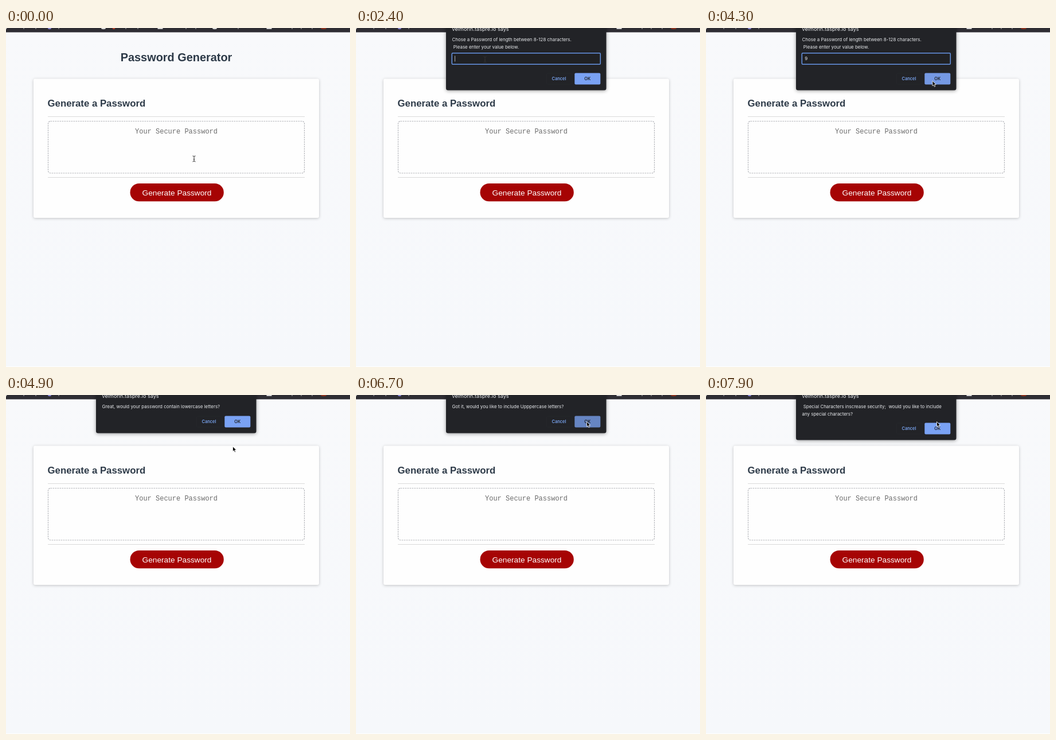
An HTML page for the animation above (8000 ms loop, 600 by 591 pixels).

```html
<!DOCTYPE html>
<html lang="en">
<head>
<meta charset="utf-8">
<title>Password Generator</title>
<style>
  html, body { margin: 0; width: 100%; height: 100%; overflow: hidden; background: #fff; }
  svg { display: block; width: 600px; height: 591px; }
  text { white-space: pre; font-family: "Liberation Sans", Arial, sans-serif; }
  .heading { font-weight: bold; fill: #2d3a48; }
  .mid { text-anchor: middle; }
  .card { filter: drop-shadow(0 1px 2.5px rgba(0, 0, 0, .22)); }
  #dialog { filter: drop-shadow(0 1px 3px rgba(0, 0, 0, .4)); }
  #dialog text { font: 7.95px Inter, sans-serif; fill: #e8eaed; }
  #dialog .host { font-size: 9.1px; }
  #dialog .label { font-size: 7.4px; font-weight: 600; }
</style>
</head>
<body>
<svg viewBox="0 0 600 591">
  <defs>
    <linearGradient id="page" x2="0" y2="1">
      <stop stop-color="#f8f9fb"/><stop offset="1" stop-color="#f6f8fb"/>
    </linearGradient>
  </defs>
  <rect width="600" height="590" fill="url(#page)"/>
  <rect width="600" height="7.5" fill="#2e2d33"/>
  <g id="bookmarks"></g>

  <text class="heading mid" x="297" y="58" font-size="19.9">Password Generator</text>
  <rect class="card" x="48" y="88.500" width="498" height="242.500" rx="3" fill="#fefefe"/>
  <text class="heading" x="72.500" y="136.700" font-size="16.8">Generate a Password</text>
  <path d="M73 154.500H521M73 260.500H521" stroke="#dadada"/>
  <rect x="73.500" y="162.500" width="447" height="90.500" rx="4" fill="none" stroke="#b3b5ba" stroke-width="1.200" stroke-dasharray="2.600 1.400"/>
  <text class="mid" x="297" y="183.500" font-size="12" fill="#6c6c6c" style="font-family:'Liberation Mono',monospace">Your Secure Password</text>
  <rect x="216.500" y="271" width="163.300" height="31.300" rx="15.650" fill="#a60404"/>
  <text class="mid" x="298" y="291.500" font-size="13.7" fill="#fff">Generate Password</text>

  <g id="dialog">
    <rect id="panel" x="157" y="-8" width="279.500" rx="3.500" fill="#222327"/>
    <text class="host" x="167.500" y="5.300">velmorin.taspre.io says</text>
    <text id="line1" x="167.500" y="23"></text>
    <text id="line2" x="167.500" y="35.500"></text>
    <g id="field">
      <rect x="167.300" y="43.800" width="259" height="19.500" rx="1.500" fill="#202124" stroke="#6795e6" stroke-width="1.500"/>
      <text id="typed" x="172.300" y="56.300">9</text>
      <path id="caret" d="M0 48.500V58.500" stroke="#d5d7da" stroke-width=".8"/>
    </g>
    <g id="buttons">
      <rect x="332.500" y=".5" width="43.500" height="19" rx="2" fill="none" stroke="#27292d" stroke-width=".7"/>
      <text class="label mid" x="354" y="12.600" style="fill:#76a0ea">Cancel</text>
      <rect id="ok" x="381.300" width="45" height="20" rx="2"/>
      <text class="label mid" x="403.800" y="12.600" style="fill:#202124">OK</text>
    </g>
  </g>

  <g id="cursor">
    <path id="arrow" d="M0 0V8.700L2 6.900 3.400 10.200 5 9.500 3.600 6.300H6.300Z" fill="#080808" stroke="#fff" stroke-width=".8"/>
    <path id="beam" d="M-2.500-5Q0-5 0-3.500Q0-5 2.500-5M0-3.500V3.500M-2.500 5Q0 5 0 3.500Q0 5 2.500 5M-1.200 1H1.200" fill="none" stroke="#333"/>
    <path id="hand" d="M-1 0Q0-1 1 0V4L5 5Q6 5 6 6.500L5 11H0L-3.500 7Q-3.500 5.500-2 6L-1 7Z" fill="#fff" stroke="#111" stroke-width=".8"/>
  </g>
</svg>
<script>
const LOOP = 8000, STEP = 100;
const $ = id => document.getElementById(id);
const ramp = (t, start, length) => Math.min(1, Math.max(0, (t - start) / length));
const show = (id, visible) => $(id).setAttribute("visibility", visible ? "inherit" : "hidden");

const dialogs = [
  { start: 950, end: 4550, height: 108.5, prompt: true,
    lines: ["Chose a Password of length between 8-128 characters.", " Please enter your value below."] },
  { start: 4650, end: 5950, height: 66.5, lines: ["Great, would your password contain lowercase letters?"] },
  { start: 6050, end: 6750, height: 66.5, lines: ["Got it, would you like to include Upppercase letters?"] },
  { start: 6850, end: 7650, height: 66.5, lines: ["Okay, would you like to include any numbers?"] },
  { start: 7750, end: 9000, height: 78.5,
    lines: [" Special Characters inscrease security;  would you like to include", "any special characters?"] }
];

// time, x, y of the pointer
const path = [
  [0, 328, 228], [800, 300, 279], [1100, 298.5, 276], [1400, 297, 270], [1900, 286, 100], [2200, 225, 55],
  [3400, 225, 55], [3800, 394.5, 94], [4900, 395.5, 89.8], [5200, 396, 89], [5700, 402.5, 46.5], [LOOP, 402.5, 46.5]
];

// [x, width, colour, round] of the sliced-off toolbar icons
const icons = [
  [0, 3, "#ccc", 1], [76, 6, "#8a86d8", 1], [170, 8, "#ddd", 1], [188, 5, "#b5432e", 1],
  [269, 9, "#e4e4e6"], [364, 8, "#ddd", 1], [459, 9, "#e4e4e6"], [554, 10, "#8c3420", 1],
  ...[31, 52, 92, 209, 230, 314, 331, 405, 499, 515, 534].map(x => [x, 1.5, "#929298"])
];
$("bookmarks").innerHTML = icons.map(([x, w, fill, round]) => round
  ? `<ellipse cx="${x}" cy="0" rx="${w / 2}" ry="2.2" fill="${fill}"/>`
  : `<rect x="${x - w / 2}" width="${w}" height="1.8" fill="${fill}"/>`).join("");

function pointerAt(t) {
  const i = path.findIndex(key => key[0] > t);
  const [t0, x0, y0] = path[i - 1], [t1, x1, y1] = path[i];
  const p = ramp(t, t0, t1 - t0), eased = p * p * (3 - 2 * p);
  return [x0 + (x1 - x0) * eased, y0 + (y1 - y0) * eased];
}

function drawDialog(t, x, y) {
  const dialog = dialogs.findLast(d => t >= d.start);
  show("dialog", dialog);
  if (!dialog) return;
  const { start, end, height, prompt, lines } = dialog;
  const top = height - 30;
  $("dialog").setAttribute("opacity", Math.min(ramp(t, start, 150), 1 - ramp(t, end, 100)));
  $("panel").setAttribute("height", height + 8);
  $("buttons").setAttribute("transform", `translate(0 ${top})`);
  $("line1").textContent = lines[0];
  $("line2").textContent = lines[1] || "";

  const typed = t >= 2600;
  const caretOn = t < 1500 || (t >= 2000 && t < 3000) || (t >= 3400 && t < 3700);
  show("field", prompt);
  show("typed", prompt && typed);
  show("caret", prompt && caretOn);
  $("caret").setAttribute("transform", `translate(${typed ? 178 : 172.6})`);

  const hover = prompt && x > 381 && y > top && y < top + 20;
  const pressed = t >= end - 140;
  $("ok").setAttribute("fill", pressed ? "#6685c3" : hover ? "#7599e4" : "#7aa2f4");
}

function draw(t) {
  const [x, y] = pointerAt(t);
  drawDialog(t, x, y);
  const open = t >= dialogs[0].start;
  const inText = open ? t < 3600 && y > 44 && y < 64 : y < 253;
  const onButton = !open && y > 271;
  show("cursor", t < 2600 || t >= 3400);
  show("beam", inText);
  show("hand", onButton);
  show("arrow", !inText && !onButton);
  $("cursor").setAttribute("transform", `translate(${x} ${y})`);
}

const origin = performance.now();
function frame() {
  const t = (performance.now() - origin) % LOOP;
  draw(Math.floor(t / STEP) * STEP);
  requestAnimationFrame(frame);
}
frame();
</script>
</body>
</html>
```
